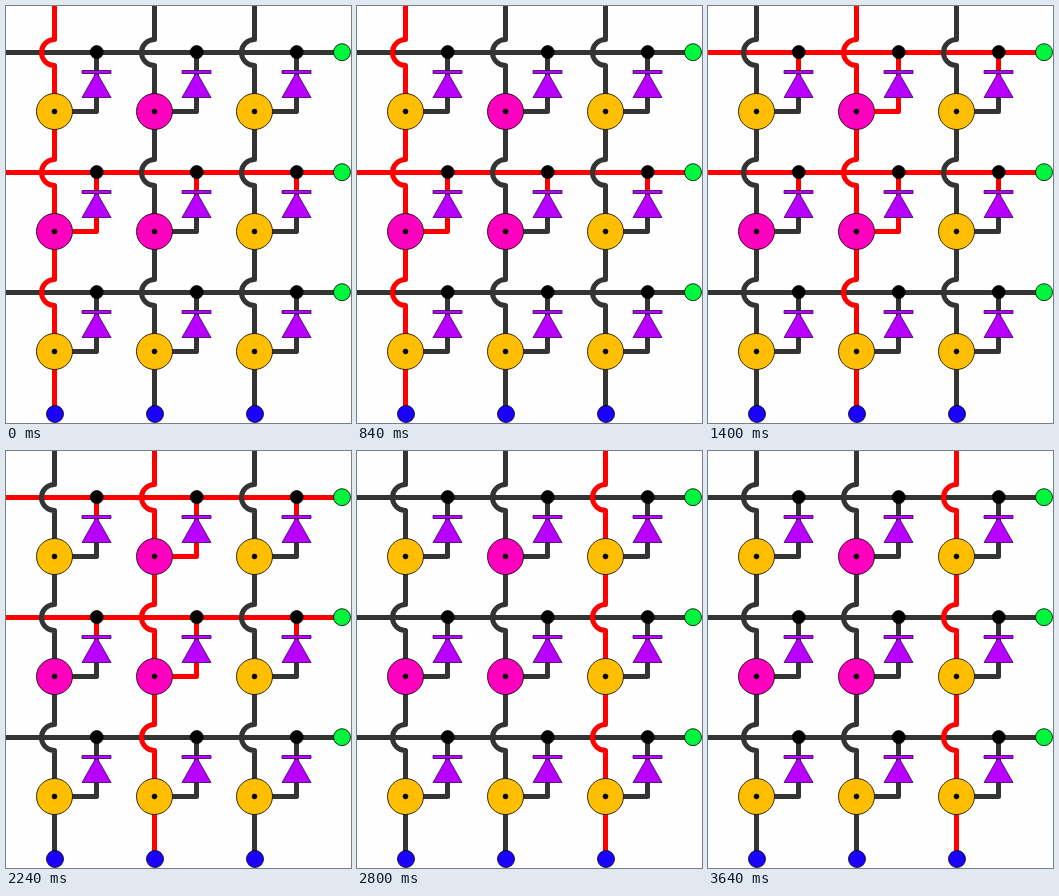
These frames come from a looping animation (345 px wide and 417 px high, 4.2 s). An HTML page:

```html
<!DOCTYPE html>
<html lang="en">
<head>
<meta charset="utf-8">
<title>Key matrix scan</title>
<style>
html, body { margin: 0; width: 100%; height: 100%; overflow: hidden; background: #fefefe; }
svg { display: block; }
.wire { fill: none; stroke: #333533; stroke-width: 5; stroke-linejoin: round; }
.wire.hot { stroke: #f00; }
.part { stroke: #000; stroke-width: .8; }
.diode { fill: #b700ff; stroke: #3c0058; stroke-width: .8; stroke-linejoin: round; }
</style>
</head>
<body>
<svg id="stage" width="345" height="417" viewBox="0 0 345 417"></svg>
<script>
const STEP = 1400;
const HOP = 13;
const cols = [48.5, 148.5, 248.5];
const rows = [46.5, 166.5, 286.5];
const pressed = [
  [0, 1, 0],
  [1, 1, 0],
  [0, 0, 0]
];
const stage = document.getElementById('stage');
const wires = [];

function add(tag, attrs) {
  const el = document.createElementNS('http://www.w3.org/2000/svg', tag);
  for (const name in attrs) el.setAttribute(name, attrs[name]);
  return stage.appendChild(el);
}

// isHot(col) tells whether the wire is live while that column is scanned
function wire(d, isHot) {
  wires.push({ el: add('path', { d, class: 'wire' }), isHot });
}

function disc(cx, cy, r, fill) {
  add('circle', { cx, cy, r, fill, class: 'part' });
}

const rowHot = r => c => pressed[r][c] === 1;

rows.forEach((y, r) => {
  cols.forEach((x, c) => {
    const dx = x + 42;
    wire(`M${dx} ${y + 40}V${y + 59}H${x}`, active => active === c && pressed[r][c] === 1);
    wire(`M${dx} ${y}V${y + 40}`, rowHot(r));
  });
  wire(`M0 ${y}H330`, rowHot(r));
});

// Columns hop over each row to the left
cols.forEach((x, c) => {
  const hops = rows.map(y => `V${y - HOP}a${HOP} ${HOP} 0 0 0 0 ${2 * HOP}`).join('');
  wire(`M${x} 0${hops}V402`, active => active === c);
  disc(x + .5, 408, 8.5, '#1a00ff');
});

rows.forEach((y, r) => {
  disc(336, y - .3, 8.5, '#00f53d');
  cols.forEach((x, c) => {
    const dx = x + 42, ky = y + 59;
    add('path', { d: `M${dx} ${y + 19.5}l14.5 25.5h-29z`, class: 'diode' });
    add('rect', { x: dx - 14.5, y: y + 18, width: 29, height: 3, class: 'diode' });
    disc(dx + .2, y - .4, 6.5, '#000');
    disc(x, ky, 18, pressed[r][c] ? '#ff00bf' : '#ffbf00');
    disc(x, ky, 2.4, '#000');
  });
});

let shown = -1;
function draw() {
  const active = Math.floor(performance.now() / STEP) % cols.length;
  if (active !== shown) {
    shown = active;
    for (const { el, isHot } of wires) el.classList.toggle('hot', isHot(active));
  }
  requestAnimationFrame(draw);
}
draw();
</script>
</body>
</html>
```
